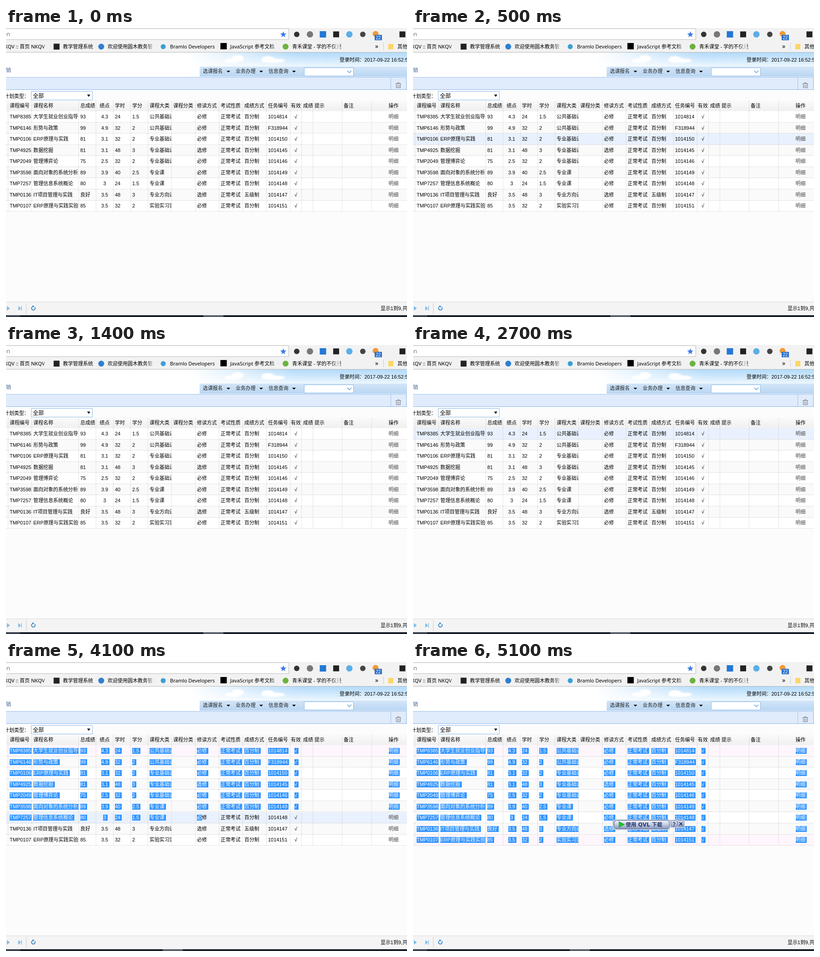
Recreate the animation shown at these times as an HTML page. Size 880 px wide and 636 px high, loop 8 s.

```html
<!DOCTYPE html>
<html lang="zh">
<head>
<meta charset="utf-8">
<title>成绩查询</title>
<style>
html, body { margin: 0; width: 100%; height: 100%; overflow: hidden; background: #fcfcfc; }
#stage {
  position: relative; width: 880px; height: 636px; overflow: hidden; background: #fcfcfc;
  font: 10.91px 'Liberation Sans', 'Noto Sans CJK SC', sans-serif; color: #000;
}
#stage > svg { position: absolute; left: 0; top: 0; }
#sky {
  position: absolute; left: 0; top: 54px; width: 880px; height: 54px;
  background: linear-gradient(90deg, #fff 400px, #fff0 640px), linear-gradient(#b2dafa, #f3faff 34px, #e8f3fd);
}
.bookmarks { font-family: 'Noto Sans', 'Noto Sans CJK SC', sans-serif; font-size: 11px; }
.wide-colon { font-family: 'Noto Sans CJK TC', sans-serif; }
.row {
  position: absolute; left: 0; width: 880px; height: 24.55px; box-sizing: border-box;
  border-bottom: 1px dotted #ccc; background: #fff;
}
.row:nth-child(odd) { background: #fafafa; }
.row.head { top: 160px; height: 23.5px; background: linear-gradient(#fafafa, #f0f0f0); }
.row.picked { background: #fff6fd; }
.row.hover { background: #e9f1fe; }
.cell {
  position: absolute; top: 0; height: 100%; box-sizing: border-box; padding: 1px 0 0 4px;
  display: flex; align-items: center; overflow: hidden; white-space: nowrap;
  border-right: 1px dotted #ccc; line-height: 13px;
}
.cell:first-child { border-left: 1px dotted #ccc; padding-left: 3px; }
.cell.mid { justify-content: center; padding-left: 1px; }
.row:not(.head) .last { color: #444; }
mark { background: #3094ff; color: #fff; height: 13px; }
mark.full { box-shadow: 3px 0 #3094ff; }
#popup { visibility: hidden; }
</style>
</head>
<body>
<div id="stage">
  <div id="sky"></div>
  <div id="grid"></div>
  <svg width="880" height="636">
    <defs>
      <linearGradient id="menu" x2="0" y2="1"><stop stop-color="#d3e5f8"/><stop offset="1" stop-color="#b9d6f2"/></linearGradient>
      <linearGradient id="fade"><stop stop-color="#f2f2f2" stop-opacity="0"/><stop offset="1" stop-color="#f2f2f2"/></linearGradient>
      <linearGradient id="steel" x2="0" y2="1"><stop stop-color="#f4f7fc"/><stop offset=".5" stop-color="#c3cde2"/><stop offset="1" stop-color="#8e9cc0"/></linearGradient>
      <filter id="soft"><feGaussianBlur stdDeviation="1.5"/></filter>
      <path id="down" d="M-4-2h8l-4 4z"/>
    </defs>

    <!-- browser bars -->
    <path fill="#f2f2f2" d="M0 0h880v53H0z"/>
    <path fill="#fff" stroke="#bdbdbd" d="M-5 1.5H620.5V25.5H-5z"/>
    <path stroke="#b8b8b8" d="M0 53.5h880"/>
    <text x="9" y="18" text-anchor="end" font-size="12.5" font-family="Noto Sans, sans-serif" fill="#777">on</text>
    <path id="star" fill="#3b78e7"/>
    <g id="icons"></g>
    <rect x="809" y="15" width="16" height="12" rx="1" fill="#2a6fc9"/>
    <text x="817" y="25" text-anchor="middle" font-size="10" fill="#fff">22</text>
    <g class="bookmarks">
      <text x="85" y="45" text-anchor="end">NKQV :: 首页 NKQV</text>
      <text x="125" y="45">教学管理系统</text>
      <text x="223" y="45">欢迎使用圆木教务管</text>
      <text x="360" y="45">Bramlo Developers</text>
      <text x="492" y="45">JavaScript 参考文档</text>
      <text x="628" y="45">青禾课堂 - 学的不仅是</text>
      <text x="810" y="45" font-size="14">»</text>
      <text x="859" y="45">其他</text>
    </g>
    <g fill="url(#fade)">
      <path d="M80 33h14v16H80z"/><path d="M308 33h18v16h-18z"/>
      <path d="M580 33h16v16h-16z"/><path d="M715 33h18v16h-18z"/>
    </g>
    <path stroke="#ccc" d="M828.5 32v17"/>
    <path fill="#fbd667" d="M839 35h11v12h-11z"/>

    <!-- page header -->
    <g fill="#fff" filter="url(#soft)">
      <ellipse cx="509" cy="67" rx="13" ry="7"/><ellipse cx="497" cy="72" rx="17" ry="5"/>
      <ellipse cx="575" cy="68" rx="14" ry="6"/><ellipse cx="586" cy="72" rx="26" ry="5"/>
    </g>
    <text x="732" y="74"><tspan class="wide-colon">登录时间：</tspan>2017-09-22 16:52:58</text>
    <path fill="url(#menu)" d="M428 85H880v22H425V88q0-3 3-3z"/>
    <text x="-11" y="97" fill="#3f5f8f">注销</text>
    <g fill="#222">
      <text x="432" y="99">选课报名</text><text x="504" y="99">业务办理</text><text x="576" y="99">信息查询</text>
    </g>
    <use href="#down" x="488" y="96"/><use href="#down" x="560" y="96"/><use href="#down" x="632" y="96"/>
    <path fill="#fff" stroke="#8bb8e8" d="M654.5 87.5h108v18h-108z"/>
    <path fill="none" stroke="#5f9fd8" stroke-width="1.5" d="M749 94l4.5 4.5 4.5-4.5"/>
    <path fill="#e0ebfc" d="M0 108h880v27H0z"/>
    <path stroke="#9fc0ea" d="M0 108.5h880M844.5 109v26M878.5 109v26"/>
    <path stroke="#8db4e6" d="M0 135.5h880"/>
    <path fill="none" stroke="#777" d="M855 122.5h12M859 122v-1.5h4v1.5M856.5 123v8.5h9V123M859.5 125v5M862.5 125v5"/>

    <!-- filter -->
    <text x="-4" y="154" class="wide-colon">计划类型：</text>
    <path fill="#fff" stroke="#8bb8e8" d="M55.5 139.5h134v19h-134z"/>
    <text x="59" y="154" font-size="12">全部</text>
    <path d="M178 146.5h7l-3.5 5z"/>

    <!-- pager and taskbar -->
    <path fill="#f4f4f4" d="M0 602h880v30H0z"/>
    <path stroke="#ddd" d="M0 602.5h880"/>
    <path stroke="#ccc" d="M44.5 605v24"/>
    <path fill="#7db9e4" d="M2 612l6.5 5-6.5 5zM27 612l5.5 5-5.5 5zM33 612h1.5v10H33z"/>
    <path fill="none" stroke="#1f7cc6" stroke-width="1.7" d="M57 614a4 4 0 1 0 6 0"/>
    <path fill="#1f7cc6" d="M57 611l5 .5-3 4z"/>
    <text x="822" y="621">显示1到9,共9条</text>
    <path fill="#18202b" d="M0 632h880v4H0z"/>
    <path fill="#3b434e" d="M0 632h31v4H0z"/>
    <rect id="task" y="632" width="44" height="4" fill="#5c636d"/>

    <g id="popup">
      <rect x="438" y="346.5" width="126" height="23" rx="4" fill="#b4bfd6"/>
      <path fill="#c4cde0" d="M562 347h34v18h-34z"/>
      <rect x="441.5" y="348.5" width="121" height="18" rx="6" fill="url(#steel)" stroke="#56658e"/>
      <path fill="#1fc32c" stroke="#128a1c" stroke-width=".7" d="M452 351l12 6.5-12 6.5z"/>
      <g font-weight="bold" fill="#27376b">
        <text x="467" y="361.5" font-size="11.5" font-family="DejaVu Sans, Noto Sans CJK SC, sans-serif">使用 QVL 下载</text>
        <g fill="url(#steel)" stroke="#6f7da3"><rect x="566.5" y="349.5" width="13" height="13" rx="2"/><rect x="581.5" y="349.5" width="13" height="13" rx="2"/></g>
        <text x="573" y="360.5" text-anchor="middle" font-size="12">?</text>
        <path fill="none" stroke="#27376b" stroke-width="1.8" d="M584.5 352.5l7 7m0-7l-7 7"/>
      </g>
    </g>
  </svg>
</div>
<script>
const $ = id => document.getElementById(id);
const LOOP = 8000, ROW_TOP = 183.2, ROW_H = 24.55;
const edges = [4, 56, 159, 197, 235, 273, 311, 363, 415, 467, 519, 571, 623, 648, 673, 737, 802, 898];
const titles = '课程编号,课程名称,总成绩,绩点,学时,学分,课程大类,课程分类,修读方式,考试性质,成绩方式,任务编号,有效,成绩,提示,备注,操作'.split(',');

// code, name, score, points, hours, credits, category, mode, task
const courses = `TMP8385,大学生就业创业指导,93,4.3,24,1.5,公共基础课,必修,1014814
TMP6146,形势与政策,99,4.9,32,2,公共基础课,必修,F318944
TMP0106,ERP原理与实践,81,3.1,32,2,专业基础课,必修,1014150
TMP4925,数据挖掘,81,3.1,48,3,专业基础课,选修,1014145
TMP2049,管理博弈论,75,2.5,32,2,专业基础课,必修,1014146
TMP3598,面向对象的系统分析与设计,89,3.9,40,2.5,专业课,必修,1014149
TMP7257,管理信息系统概论,80,3,24,1.5,专业课,必修,1014148
TMP0136,IT项目管理与实践,良好,3.5,48,3,专业方向课,选修,1014147
TMP0107,ERP原理与实践实验,85,3.5,32,2,实验实习实训,必修,1014151`.split('\n').map(line => {
  const c = line.split(',');
  const grading = c[2] === '良好' ? '五级制' : '百分制';
  return [...c.slice(0, 7), '', c[7], '正常考试', grading, c[8], '√', '', '', '', '明细'];
});

function addRow(values, top) {
  const row = document.createElement('div');
  row.className = 'row';
  if (top === undefined) row.classList.add('head');
  else row.style.top = top + 'px';
  row.cells = values.map((value, i) => {
    const cell = document.createElement('div');
    cell.className = 'cell';
    if ([3, 12, 16].includes(i)) cell.classList.add('mid');
    if (i === 16) cell.classList.add('last');
    cell.style.left = edges[i] + 'px';
    cell.style.width = edges[i + 1] - edges[i] + 1 + 'px';
    cell.textContent = value;
    return row.appendChild(cell);
  });
  $('grid').append(row);
  return row;
}
addRow(titles);
const rows = courses.map((c, i) => addRow(c, ROW_TOP + i * ROW_H));

// Plain stand-ins for toolbar and bookmark icons: x, y, size, colour, round
const icons = [
  [638, 14, 12, '#333', 1], [667, 14, 14, '#777', 1], [695.5, 14, 14, '#2478d4', 0],
  [724.5, 14, 13, '#222', 0], [753.5, 14, 14, '#5aaee8', 1], [783, 14, 12, '#444', 1],
  [811, 13, 13, '#f29a38', 1], [870, 14, 13, '#222', 0],
  [111, 41, 13, '#222', 0], [209, 41, 13, '#2f7fd0', 1], [345, 41, 11, '#3aa0d8', 1],
  [477.5, 40, 14, '#000', 0], [613.5, 41, 13, '#6db33f', 1]
];
$('icons').innerHTML = icons.map(([x, y, s, color, round]) =>
  `<rect x="${x - s / 2}" y="${y - s / 2}" width="${s}" height="${s}" rx="${round ? s / 2 : 0}" fill="${color}"/>`).join('');

const starPoint = (_, i) => {
  const r = i % 2 ? 3 : 7.2, a = i * Math.PI / 5;
  return `${608.5 + r * Math.sin(a)} ${14.5 - r * Math.cos(a)}`;
};
$('star').setAttribute('d', 'M' + Array.from({ length: 10 }, starPoint).join('L') + 'Z');

// sel marks the end of the selection: row, column, characters in that cell
const timeline = [
  { at: 0 },
  { at: 200, hover: 1 }, { at: 300, hover: 4 }, { at: 400, hover: 3 }, { at: 500, hover: 2 },
  { at: 700, hover: 1 }, { at: 800, hover: 0 },
  { at: 1400 },
  { at: 2700, hover: 0 },
  { at: 3600, picked: [0], sel: [0, 0, 4] },
  { at: 3700, picked: [0], sel: [0, 1, 4] },
  { at: 3800, picked: [0], hover: 1, sel: [1, 1, 5] },
  { at: 3900, picked: [0], hover: 3, sel: [3, 3, 3] },
  { at: 4000, picked: [0], hover: 4, sel: [4, 6, 1] },
  { at: 4100, picked: [0], hover: 6, sel: [6, 8, 1] },
  { at: 4200, picked: [0], hover: 7, sel: [7, 10, 2] },
  { at: 4300, picked: [0, 8], sel: [9, 0, 0] },
  { at: 5100, picked: [0, 8], sel: [9, 0, 0], popup: true }
];

function paintCell(cell, text, count, full) {
  cell.textContent = text.slice(count);
  if (!count || !text) return;
  const mark = document.createElement('mark');
  mark.className = full ? 'full' : '';
  mark.textContent = text.slice(0, count);
  cell.prepend(mark);
}

function show({ at, hover, picked = [], sel = [-1, 0, 0], popup }) {
  const [endRow, endCol, endChar] = sel;
  rows.forEach((row, r) => {
    row.classList.toggle('hover', r === hover);
    row.classList.toggle('picked', picked.includes(r));
    row.cells.forEach((cell, c) => {
      const text = courses[r][c];
      const before = r < endRow || (r === endRow && c < endCol);
      const atEnd = r === endRow && c === endCol;
      paintCell(cell, text, before ? text.length : atEnd ? endChar : 0, before);
    });
  });
  $('task').setAttribute('x', at < 3600 ? 433 : 344);
  $('popup').style.visibility = popup ? 'visible' : 'hidden';
}

let current;
const start = performance.now();
function tick() {
  const t = (performance.now() - start) % LOOP;
  const step = timeline.findLast(s => s.at <= t);
  if (step !== current) show(current = step);
  requestAnimationFrame(tick);
}
tick();
</script>
</body>
</html>
```
